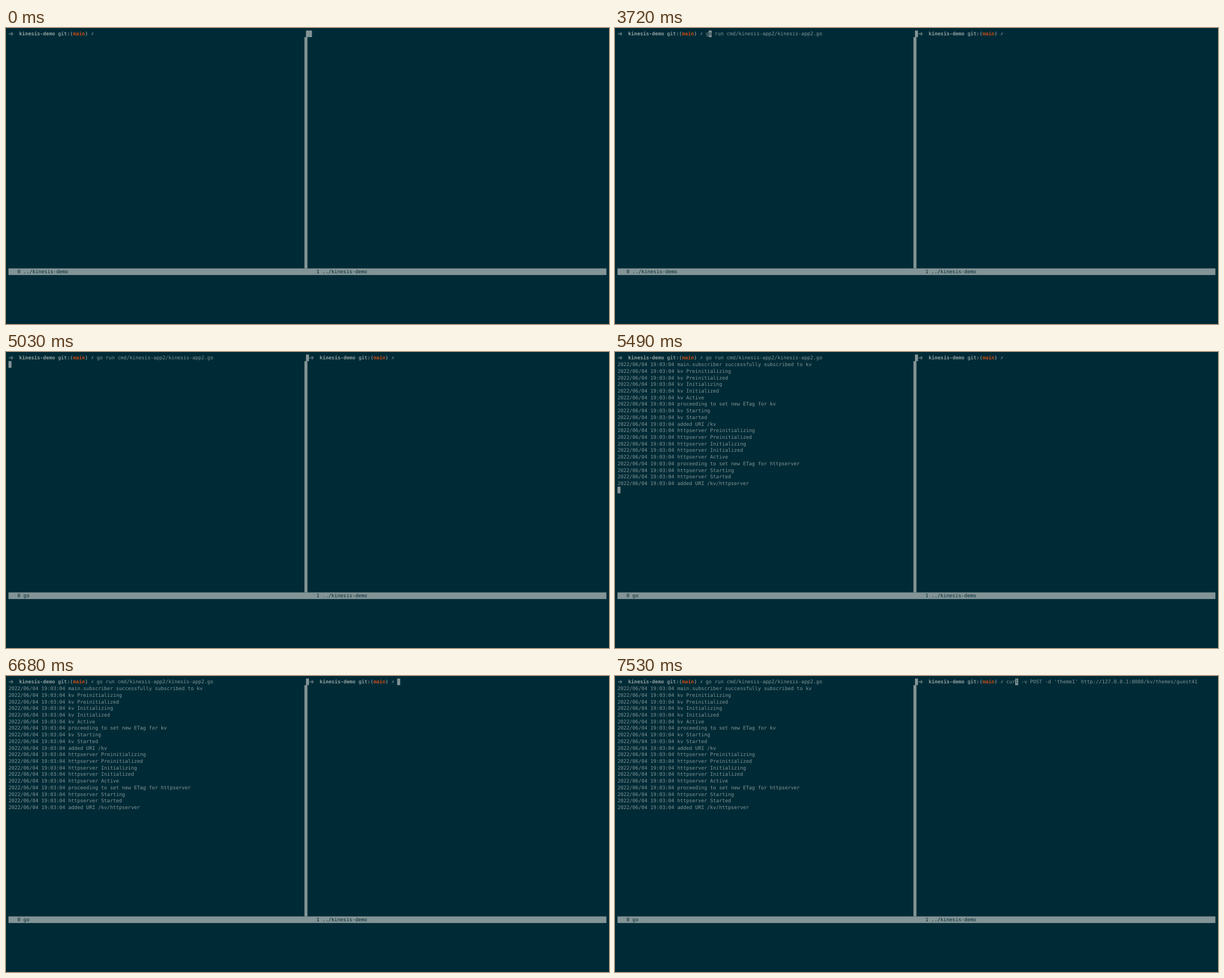
These frames come from a looping animation (1067 px wide and 525 px high, 8 s). An HTML page with a canvas:

```html
<!DOCTYPE html>
<html lang="en">
<head>
<meta charset="utf-8">
<title>Terminal session</title>
<style>
html, body { margin: 0; width: 100%; height: 100%; overflow: hidden; background: #002b36; }
canvas { display: block; }
</style>
</head>
<body>
<canvas id="stage" width="1067" height="525"></canvas>
<script>
const ctx = document.getElementById('stage').getContext('2d');
const LOOP = 8000;
const LEFT = 4.4, TOP = 4.5, CELL = 5.29, LINE = 11.72, BASELINE = 8.9;
const BG = '#002b36', FG = '#839496', BRIGHT = '#93a1a1',
      RED = '#cb4b16', ARROW = '#586e75', CROSS = '#657b83';

// The wide arrow pushes the rest of the first row to the right.
const ARROW_SHIFT = 3, PROMPT_SHIFT = 2.7, PROMPT_COLS = 29;
const colX = col => LEFT + col * CELL;
const rowY = row => TOP + row * LINE;
const DIVIDER_X = colX(99) + PROMPT_SHIFT;
const RIGHT_X = DIVIDER_X + CELL;
const inputX = paneX => paneX + PROMPT_COLS * CELL + PROMPT_SHIFT;

const RUN = 'go run cmd/kinesis-app2/kinesis-app2.go';
const CURL = "curl -v POST -d 'theme1' http://127.0.0.1:8080/kv/themes/guest41";

const serviceLog = (name, uri) => [
  ...['Preinitializing', 'Preinitialized', 'Initializing', 'Initialized', 'Active'].map(s => `${name} ${s}`),
  `proceeding to set new ETag for ${name}`,
  `${name} Starting`, `${name} Started`, `added URI ${uri}`
];
const LOG = [
  'main.subscriber successfully subscribed to kv',
  ...serviceLog('kv', '/kv'),
  ...serviceLog('httpserver', '/kv/httpserver')
].map(message => '2022/06/04 19:03:04 ' + message);

// Last value whose start time has been reached.
const at = (t, steps) => steps.reduce((value, [start, next]) => t >= start ? next : value, null);

function block(x, y, cols = 1, rows = 1) {
  ctx.fillStyle = FG;
  ctx.fillRect(x, y, cols * CELL, rows * LINE);
}

function text(string, x, row, color = FG, weight = 'normal') {
  ctx.font = `${weight} 8.79px "DejaVu Sans Mono", "DejaVu Sans", monospace`;
  ctx.fillStyle = color;
  ctx.fillText(string, x, rowY(row) + BASELINE);
}

function prompt(x) {
  const y = rowY(0) + LINE / 2;
  ctx.strokeStyle = ARROW;
  ctx.lineWidth = 1.7;
  ctx.beginPath();
  ctx.moveTo(x + 0.6, y);
  ctx.lineTo(x + 7.4, y);
  ctx.moveTo(x + 4.9, y - 2.8);
  ctx.lineTo(x + 7.7, y);
  ctx.lineTo(x + 4.9, y + 2.8);
  ctx.stroke();
  const put = (string, col, color) => text(string, x + ARROW_SHIFT + col * CELL, 0, color, 'bold');
  put('kinesis-demo', 3, BRIGHT);
  put('git:(', 16, FG);
  put('main', 21, RED);
  put(')', 25, FG);
  put('✗', 27, CROSS);
}

// cursor is the character index under the block, or null when it is elsewhere.
function commandLine(paneX, command, cursor) {
  const x = inputX(paneX);
  text(command, x, 0);
  if (cursor === null) return;
  const cursorX = x + cursor * CELL;
  block(cursorX, rowY(0));
  text(command[cursor] || '', cursorX, 0, BG);
}

function draw(t) {
  ctx.fillStyle = BG;
  ctx.fillRect(0, 0, 1067, 525);

  block(DIVIDER_X, rowY(0));
  block(colX(99), rowY(1), 1, 35);
  block(LEFT, rowY(36), 200);
  text(t < 5030 ? '0 ../kinesis-demo' : '0 go', colX(3), 36, BG);
  text('1 ../kinesis-demo', colX(103), 36, BG);

  prompt(LEFT);
  const runCursor = at(t, [[120, 0], [3720, 1], [3780, 2], [3910, 3], [4300, RUN.length], [5030, null]]);
  commandLine(LEFT, t >= 3720 ? RUN : '', runCursor);

  if (t >= 5490) LOG.forEach((line, i) => text(line, LEFT, i + 1));
  const logCursor = at(t, [[5030, 1], [5490, 20], [5950, 21], [6350, 22], [6680, null]]);
  if (logCursor) block(LEFT, rowY(logCursor));

  if (t < 60) {
    block(RIGHT_X, rowY(0));
  } else {
    prompt(RIGHT_X);
    const curlCursor = at(t, [[60, 0], [120, null], [6680, 0], [7340, 1], [7440, 2], [7530, 3]]);
    commandLine(RIGHT_X, t >= 7340 ? CURL : '', curlCursor);
  }
}

ctx.textRendering = 'geometricPrecision';
function tick() {
  draw(performance.now() % LOOP);
  requestAnimationFrame(tick);
}
tick();
</script>
</body>
</html>
```
